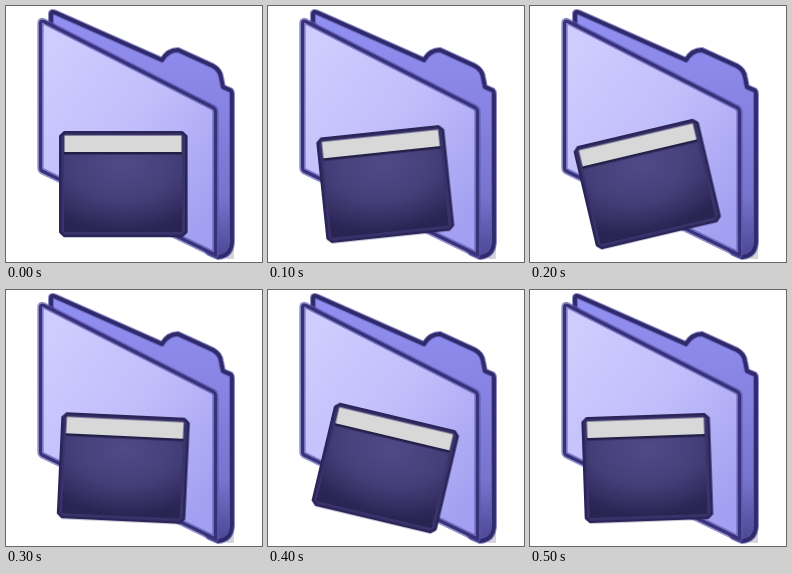
An HTML page for the animation above (0.6 s loop, 256 by 256 pixels).

```html
<!DOCTYPE html>
<html lang="en">
<head>
<meta charset="utf-8">
<title>Rocking folder</title>
<style>
  html, body { margin: 0; width: 100%; height: 100%; overflow: hidden; background: #fff; }
  svg { display: block; width: 100vw; height: 100vh; }
  #panel { transform-origin: 117.3px 178.2px; }
</style>
</head>
<body>
<svg viewBox="0 0 256 256" stroke-linejoin="round">
  <defs>
    <linearGradient id="back" x1="0" y1="0" x2="0" y2="1">
      <stop offset="0" stop-color="#9290f2"/>
      <stop offset=".4" stop-color="#8683e2"/>
      <stop offset=".75" stop-color="#7774ce"/>
      <stop offset="1" stop-color="#4b4793"/>
    </linearGradient>
    <linearGradient id="front" gradientUnits="userSpaceOnUse" x1="40" y1="60" x2="215" y2="190">
      <stop offset="0" stop-color="#cecbfe"/>
      <stop offset=".5" stop-color="#c0bdfb"/>
      <stop offset="1" stop-color="#a3a0f1"/>
    </linearGradient>
    <radialGradient id="body" cx=".5" cy=".15" r=".85">
      <stop offset="0" stop-color="#504a88"/>
      <stop offset=".55" stop-color="#443e78"/>
      <stop offset="1" stop-color="#2a2453"/>
    </radialGradient>
    <path id="rear" d="M45 18 L45 8 Q45 5 49 6.500 L156 54 Q162 44 172 44 L207 60 Q214 64 215 71 L217 81 L225 84.500 Q226 85.500 226 88 L226 236 Q225 250 212 251 L203 247 Z"/>
    <path id="face" d="M34.500 17 Q34.500 14 38 15.500 L207 101.500 Q209.500 103 209.500 106 L209.500 249 L36 165 Q34.500 164 34.500 162 Z"/>
  </defs>

  <path d="M221 253 L228 253 L228 236 L218 248 Z" fill="#d6d6da"/>
  <use href="#rear" fill="url(#back)" stroke="#5753a8" stroke-opacity=".65" stroke-width="6"/>
  <use href="#rear" fill="none" stroke="#2f2a6b" stroke-width="3.800"/>
  <use href="#face" fill="url(#front)" stroke="#5b57ae" stroke-opacity=".65" stroke-width="6.400"/>
  <use href="#face" fill="none" stroke="#37327a" stroke-width="3.200"/>

  <g id="panel">
    <path d="M58.500 126.300 H176 L180.300 130.300 V226 L176 230 H58.500 L54.300 226 V130.300 Z"
          fill="#39336b" stroke="#2a2458" stroke-width="2.600"/>
    <rect x="58" y="147" width="118" height="79" fill="url(#body)"/>
    <rect x="58" y="146" width="118" height="2.500" fill="#241f48"/>
    <rect x="58.500" y="129.500" width="117" height="16.500" fill="#d8d8d8"/>
  </g>
</svg>
<script>
  const angles = [0, -6, -13.3, 2.7, 13.4, -2];
  const pose = (deg, i) => ({
    transform: `rotate(${deg}deg)`,
    offset: i / angles.length,
    easing: "step-end"
  });
  const swing = document.getElementById("panel").animate(
    [...angles, angles[0]].map(pose),
    { duration: 600, iterations: Infinity }
  );
  swing.startTime = 0;
</script>
</body>
</html>
```
